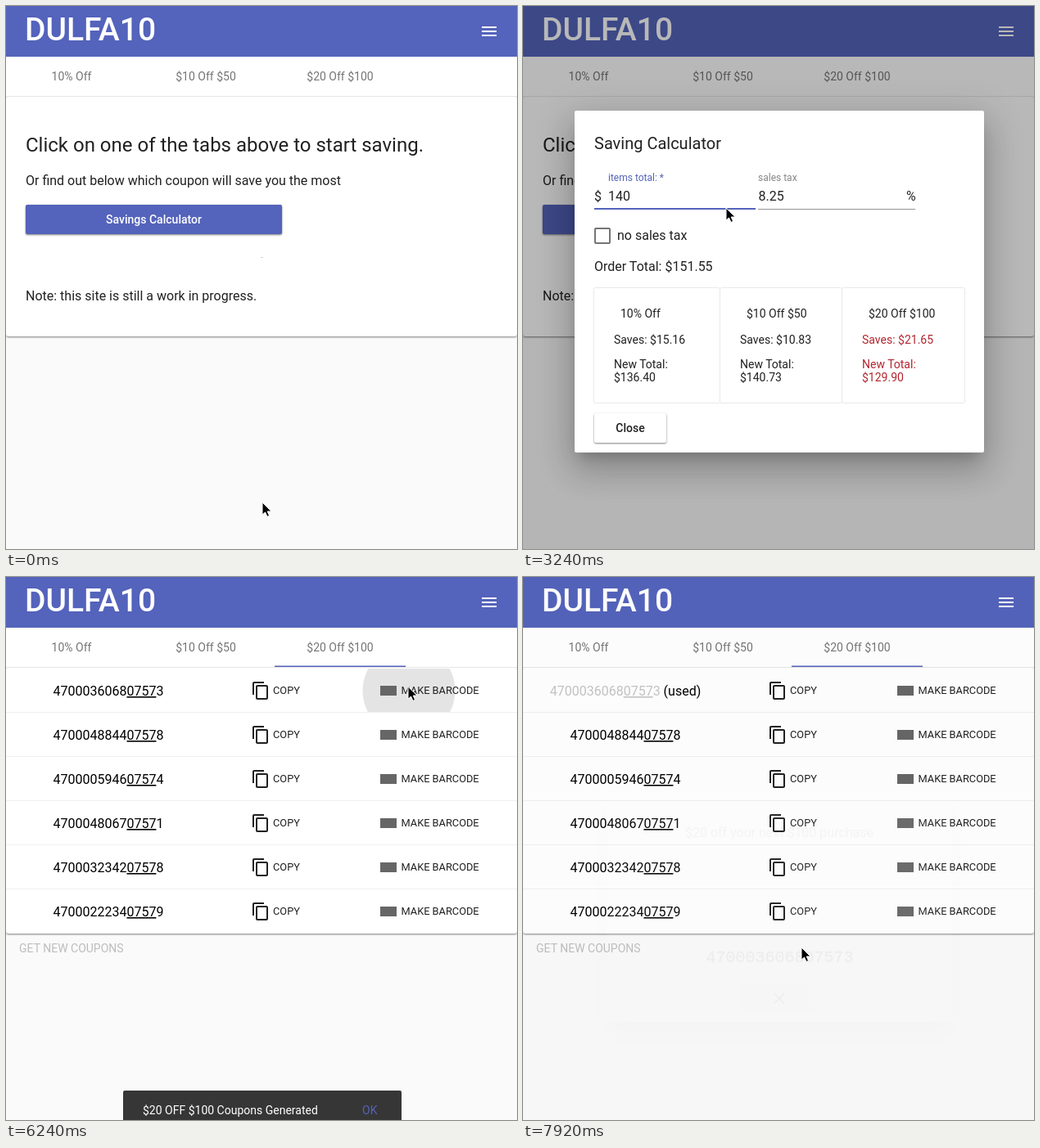
An HTML page that plays this animation: 624x664 px, repeating every 8 s.

```html
<!DOCTYPE html>
<html lang="en">
<head>
<meta charset="utf-8">
<title>Coupon savings</title>
<style>
  html, body { margin: 0; width: 100%; height: 100%; overflow: hidden; background: #fafafa; }
  #stage { position: relative; width: 624px; height: 664px; overflow: hidden; }
  #stage > * { position: absolute; }
  svg { display: block; overflow: visible; font: 16px Roboto, sans-serif; fill: #212121; }
  .layer { left: 0; top: 0; width: 624px; height: 664px; }
  .small { font-size: 14px; }
  .label { font-size: 12px; }
  .medium { font-size: 14px; font-weight: 500; }
  .action { font-size: 12.8px; }
  .tab { font-size: 14px; fill: #757575; text-anchor: middle; }
  .middle { text-anchor: middle; }
  .sheet { fill: #fff; filter: drop-shadow(0 1px 1px rgba(0,0,0,.5)); }
  .blue { fill: #5463bb; }
  .red { fill: #b3262e; }
  .used { fill: #c4c4c4; }
  .underlined { text-decoration: underline 1px; text-underline-offset: 1px; }
  .logo { font-size: 39px; font-weight: 500; fill: #fff; }
  #backdrop { inset: 0; background: #000; }
  .dialog {
    background: #fff; border-radius: 2px;
    box-shadow: 0 11px 15px -7px rgba(0,0,0,.2), 0 24px 38px 3px rgba(0,0,0,.14), 0 9px 46px 8px rgba(0,0,0,.12);
  }
  #calculator { left: 63px; top: 128px; width: 500px; height: 418px; }
  #coupon { left: 102px; top: 196px; width: 422px; height: 281px; }
</style>
</head>
<body>
<div id="stage">
  <svg class="layer" viewBox="0 0 624 664">
    <defs>
      <clipPath id="buttonClip"><rect x="24" y="243" width="313" height="36" rx="2"/></clipPath>
      <clipPath id="rowClip"><rect x="407" y="112" width="217" height="54"/></clipPath>
    </defs>
    <rect width="624" height="664" fill="#fafafa"/>
    <rect width="624" height="112" fill="#fff"/>
    <g id="home">
      <rect class="sheet" y="111" width="624" height="293" rx="3"/>
      <text x="24" y="178" font-size="24">Click on one of the tabs above to start saving.</text>
      <text x="24" y="219">Or find out below which coupon will save you the most</text>
      <rect class="sheet" style="fill:#5463bb" x="24" y="243" width="313" height="36" rx="2"/>
      <circle id="buttonRipple" cx="199" cy="269" fill="#fff" clip-path="url(#buttonClip)"/>
      <text class="medium middle" x="180.5" y="266" style="fill:#fff">Savings Calculator</text>
      <rect x="312" y="307" width="1" height="1" fill="#999"/>
      <text x="24" y="360">Note: this site is still a work in progress.</text>
    </g>
    <g id="list">
      <rect class="sheet" y="111" width="624" height="325" rx="3"/>
      <rect id="rowFocus" x="407" y="112" width="217" height="54" fill-opacity=".07"/>
      <circle id="rowRipple" cx="492" cy="139" clip-path="url(#rowClip)"/>
      <g id="rows"></g>
      <text class="small" x="16" y="459" style="fill:#bdbdbd">GET NEW COUPONS</text>
    </g>
    <path d="M0 110.5H624" stroke="#e6e6e6"/>
    <rect id="inkBar" class="blue" x="328" y="108.5" width="160" height="1.5"/>
    <rect class="blue" width="624" height="62"/>
    <text class="logo" x="23" y="42">DULFA10</text>
    <path d="M581 26H599M581 31H599M581 36H599" stroke="#fff" stroke-width="2"/>
    <text class="tab" x="80" y="91">10% Off</text>
    <text class="tab" x="244" y="91">$10 Off $50</text>
    <text class="tab" x="408" y="91">$20 Off $100</text>
    <g id="snackbar">
      <rect x="143" y="628" width="340" height="48" rx="2" fill="#363636"/>
      <text class="small" x="167" y="657" style="fill:#fff">$20 OFF $100 Coupons Generated</text>
      <text class="small blue" x="435" y="657">OK</text>
    </g>
  </svg>

  <div id="backdrop"></div>

  <div id="calculator" class="dialog">
    <svg viewBox="63 128 500 418" width="500" height="418">
      <text x="87" y="175" font-size="20">Saving Calculator</text>
      <text class="label blue" x="104" y="214">items total: *</text>
      <text class="label" x="287" y="214" style="fill:#858585">sales tax</text>
      <text x="87" y="238">$</text>
      <text id="amount" x="104" y="238"></text>
      <text x="287.5" y="238">8.25</text>
      <text x="468" y="238">%</text>
      <rect class="blue" x="87" y="247" width="197" height="2"/>
      <rect x="287" y="248" width="192" height="1" fill="#949494"/>
      <rect x="88" y="272" width="18" height="18" rx="1" fill="none" stroke="#757575" stroke-width="2"/>
      <text x="115" y="286">no sales tax</text>
      <text id="orderTotal" x="87" y="324"></text>
      <g id="cards"></g>
      <rect class="sheet" x="87" y="498" width="88" height="36" rx="2"/>
      <text class="medium middle" x="131" y="521">Close</text>
    </svg>
  </div>

  <div id="coupon" class="dialog">
    <svg viewBox="102 197 422 281" width="422" height="281">
      <text class="middle" x="313" y="252" style="fill:#444">$20 off your next $100 purchase</text>
      <text class="middle" x="313.5" y="405" stroke="#212121" stroke-width=".4"
            style="font:20px 'Liberation Mono',monospace">470003606807573</text>
      <rect id="closeHover" x="268" y="431" width="89" height="36" rx="2" fill-opacity=".12"/>
      <path d="M307 443L319 455M319 443L307 455" stroke="#333" stroke-width="2"/>
    </svg>
  </div>

  <svg class="layer" viewBox="0 0 624 664">
    <path id="cursor" d="M0 0V15.2L3.5 12 6 17.4 8.6 16.3 6.2 11H11Z" fill="#000" stroke="#fff"/>
  </svg>
</div>

<script>
const $ = id => document.getElementById(id);
const LOOP = 8000, TAX = 1.0825;
const CALC_OPEN = 1445, CALC_CLOSE = 4620, PAGE_SWITCH = 4900;
const COUPON_OPEN = 6242, COUPON_CLOSE = 7692;

const clamp = v => Math.min(1, Math.max(0, v));
const money = v => '$' + (Math.round(v * 100 + 1e-6) / 100).toFixed(2);
const show = (id, on) => $(id).style.display = on ? '' : 'none';

function bezier(x1, y1, x2, y2) {
  const at = (a, b, s) => 3 * a * s * (1 - s) ** 2 + 3 * b * s * s * (1 - s) + s ** 3;
  return x => {
    let lo = 0, hi = 1;
    for (let i = 0; i < 24; i++) {
      const mid = (lo + hi) / 2;
      if (at(x1, x2, mid) < x) lo = mid; else hi = mid;
    }
    return at(y1, y2, hi);
  };
}
const swift = bezier(.25, .8, .25, 1);
const decelerate = bezier(0, 0, .2, 1);
const accelerate = bezier(.4, 0, 1, 1);
const smooth = bezier(.4, 0, .3, 1);
function progress(t, start, length, ease) {
  const x = clamp((t - start) / length);
  return x === 0 || x === 1 ? x : ease(x);
}

// time, x, y of the pointer tip
const pointer = [
  [120, 313, 607], [1080, 198, 269], [1500, 198, 269], [2040, 248, 247],
  [3600, 248, 247], [4400, 441, 411], [4440, 441, 411], [4610, 412, 88],
  [5100, 412, 88], [5880, 491, 134], [6840, 491, 134], [7500, 340, 453]
];
function pointerAt(t) {
  const next = pointer.findIndex(p => p[0] > t);
  if (next === 0) return pointer[0].slice(1);
  if (next < 0) return pointer.at(-1).slice(1);
  const [t0, x0, y0] = pointer[next - 1], [t1, x1, y1] = pointer[next];
  const k = progress(t, t0, t1 - t0, smooth);
  return [x0 + (x1 - x0) * k, y0 + (y1 - y0) * k];
}

const codes = ['470003606807573', '470004884407578', '470000594607574',
               '470004806707571', '470003234207578', '470002223407579'];
const copyIcon = 'M16 1H4c-1.1 0-2 .9-2 2v14h2V3h12V1zm3 4H8c-1.1 0-2 .9-2 2v14c0 1.1.9 2 2 2h11' +
                 'c1.1 0 2-.9 2-2V7c0-1.1-.9-2-2-2zm0 16H8V7h11v14z';
const codeText = (code, used) =>
  `<tspan class="${used ? 'used' : ''}">${code.slice(0, 10)}<tspan class="underlined">` +
  `${code.slice(10, 14)}</tspan>${code[14]}</tspan>${used ? ' (used)' : ''}`;

$('rows').innerHTML = codes.map((code, i) => `
  <g transform="translate(0 ${i * 54})">
    ${i < 5 ? '<path d="M0 165.5H624" stroke="#f0f0f0"/>' : ''}
    <text class="middle" x="125" y="145" fill="#000">${codeText(code)}</text>
    <path transform="translate(299 127)" d="${copyIcon}"/>
    <text class="action" x="326" y="143">COPY</text>
    <rect x="457" y="133" width="20" height="12" fill="#666"/>
    <text class="action" x="482.5" y="143">MAKE BARCODE</text>
  </g>`).join('');
const firstCode = $('rows').querySelector('text');

const offers = [
  { x: 87, width: 153, name: '10% Off', saving: v => v * .1 },
  { x: 241, width: 148, name: '$10 Off $50', saving: v => v >= 50 ? 10 : 0 },
  { x: 390, width: 149, name: '$20 Off $100', saving: v => v >= 100 ? 20 : 0 }
];
function drawCalculator(typed) {
  const value = Number(typed);
  const best = Math.max(...offers.map(o => o.saving(value)));
  $('amount').textContent = typed;
  $('orderTotal').textContent = 'Order Total: ' + money(value * TAX);
  $('cards').innerHTML = offers.map(({ x, width, name, saving }, i) => {
    const saved = saving(value), total = money((value - saved) * TAX);
    const fits = i === 0 && total.length < 6;
    return `
      <rect x="${x - .5}" y="344.5" width="${width + 1}" height="141" rx="2" fill="#fff" stroke="#e8e8e8"/>
      <g class="small">
        <text x="${x + 32}" y="381">${name}</text>
        <g class="${saved && saved === best ? 'red' : ''}">
          <text x="${x + 24}" y="413">Saves: ${money(saved * TAX)}</text>
          <text x="${x + 24}" y="443">New Total:${fits ? ' ' + total : ''}</text>
          <text x="${x + 24}" y="459">${fits ? '' : total}</text>
        </g>
      </g>`;
  }).join('');
}

// Slides up while growing in; slides down while fading out. Returns the backdrop strength.
function poseDialog(id, t, open, close) {
  const enter = progress(t, open, 400, swift), leave = progress(t, close, 400, swift);
  const opacity = progress(t, open, 200, swift) * (1 - leave);
  show(id, opacity > 0);
  $(id).style.opacity = opacity;
  $(id).style.transform = `translateY(${25 * (1 - enter + leave)}%) scale(${.9 + .1 * enter})`;
  return enter * (1 - leave);
}

function poseRipple(id, t, start, length, radius, opacity, fadeStart) {
  $(id).setAttribute('r', radius * progress(t, start, length, decelerate));
  $(id).setAttribute('fill-opacity', opacity * (1 - clamp((t - fadeStart) / 300)));
}

let lastTyped = null;
function draw(t) {
  const onList = t >= PAGE_SWITCH;
  show('home', !onList);
  show('list', onList);
  show('inkBar', onList);

  poseRipple('buttonRipple', t, 1310, 450, 176, .2, 1500);
  poseRipple('rowRipple', t, 6197, 300, 140, .12, COUPON_CLOSE - 100);

  const typed = '140'.slice(0, [2700, 2940, 3240].filter(at => t >= at).length);
  if (typed !== lastTyped) drawCalculator(lastTyped = typed);

  const used = t >= COUPON_OPEN;
  show('rowFocus', used && t < COUPON_CLOSE);
  if (firstCode.dataset.used !== String(used)) {
    firstCode.dataset.used = used;
    firstCode.innerHTML = codeText(codes[0], used);
  }

  const rise = progress(t, 4920, 200, decelerate), sink = progress(t, 7700, 195, accelerate);
  $('snackbar').setAttribute('transform', `translate(0 ${48 * (1 - rise + sink)})`);

  const shade = poseDialog('calculator', t, CALC_OPEN, CALC_CLOSE) +
                poseDialog('coupon', t, COUPON_OPEN, COUPON_CLOSE);
  $('backdrop').style.opacity = .28 * shade;
  show('closeHover', t > 7420);

  $('cursor').setAttribute('transform', `translate(${pointerAt(t)})`);
}

const begin = performance.now();
function tick() {
  draw((performance.now() - begin) % LOOP);
  requestAnimationFrame(tick);
}
tick();
</script>
</body>
</html>
```
